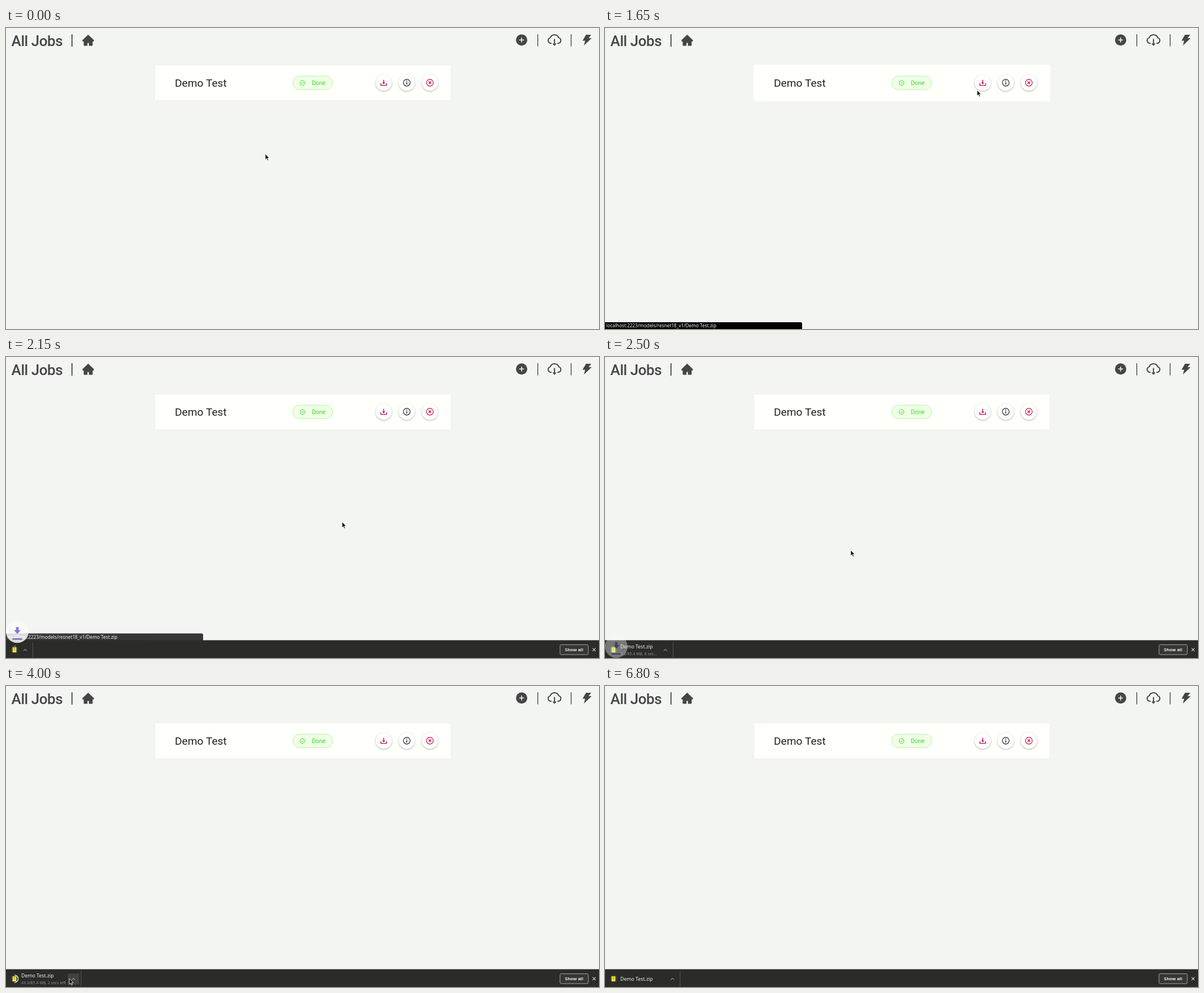
An HTML page that plays this animation: 1050 by 533 pixels, repeating every 6.85 s.

```html
<!DOCTYPE html>
<html lang="en">
<head>
<meta charset="utf-8">
<title>All Jobs</title>
<style>
  html, body { margin: 0; width: 100%; height: 100%; overflow: hidden; background: #f3f5f3; }
  svg { display: block; width: 1050px; height: 533px; }
  text { white-space: pre; }
  .page { font-family: Roboto, sans-serif; }
  .chrome { font-family: "Noto Sans", "Open Sans", sans-serif; }
  .line { fill: none; stroke: currentColor; stroke-width: 1.4; }
  .disc { fill: #fff; filter: drop-shadow(0 1px 1.6px rgba(0, 0, 0, .32)); }
</style>
</head>
<body>
<svg viewBox="0 0 1050 533">
  <rect width="1050" height="533" fill="#f3f5f3"/>

  <g class="page" fill="#454545" color="#454545">
    <text x="9.6" y="31.5" font-size="26" font-weight="500" letter-spacing="-.47">All Jobs</text>
    <path d="M116 11h1.6v22h-1.6zM941 11h1.2v21.5h-1.2zM1000 11h1.2v21.5h-1.2z" fill="#303030"/>
    <path d="M145.5 11.8 155.6 21.6Q156.4 23.8 154.5 24H153.4V30.6Q153.4 31.4 152.6 31.4H146.8V26.4H144.2V31.4H138.4Q137.6 31.4 137.6 30.6V24H136.5Q134.6 23.8 135.4 21.6Z"/>
    <circle cx="913" cy="21.2" r="10"/>
    <path d="M913 17v8.4M908.8 21.2h8.4" stroke="#f3f5f3" stroke-width="1.6"/>
    <path class="line" style="stroke-width:2" d="M966 27h-1.4a4.9 4.9 0 0 1-1-9.6a8 8 0 0 1 15.2 0a4.9 4.9 0 0 1-1 9.6h-1.4"/>
    <path d="M970.2 19.5h2v8h2.8l-3.8 4.3-3.8-4.3h2.8z"/>
    <path d="M1027 12h9.2l-4.7 6h5.5l-13.7 13 2.2-8.5h-4.6z"/>
  </g>

  <rect id="card" x="263.5" y="65.5" width="524.5" height="63.5" rx="1" fill="#fffffb"/>
  <g class="page">
    <text x="299" y="103.5" font-size="19.2" fill="#222">Demo Test</text>
    <rect x="508" y="85.2" width="70" height="24" rx="12" fill="#f0ffe6" stroke="#b6f59e"/>
    <g color="#35d92f">
      <circle class="line" cx="525" cy="97.3" r="4.2" stroke-width="1" style="stroke-width:1"/>
      <path class="line" style="stroke-width:1" d="m523 97.3 1.5 1.6 2.6-3.2"/>
      <text x="541.4" y="101.2" font-size="10.6" fill="currentColor">Done</text>
    </g>
    <circle class="disc" cx="668.8" cy="97" r="14.2"/>
    <circle class="disc" cx="709.6" cy="97" r="14.2"/>
    <circle class="disc" cx="750.5" cy="97" r="14.2"/>
    <path class="line" color="#c20b55" d="M663.8 98v3.6h10V98M668.8 91.8v6"/>
    <path fill="#c20b55" d="M666.2 96.4h5.2l-2.6 3.3z"/>
    <g class="line" color="#222">
      <circle cx="709.6" cy="96.8" r="6" style="stroke-width:1.2"/>
      <path d="M709.6 95.8v4.4M709.6 93v1.5"/>
    </g>
    <g class="line" color="#c5124f">
      <circle cx="750.5" cy="96.8" r="6" style="stroke-width:1.2"/>
      <path d="m748.3 94.6 4.4 4.4m0-4.4-4.4 4.4"/>
    </g>
  </g>

  <g id="bubble" class="chrome">
    <path d="M0 0H346Q349 0 349 3V12.5H0Z"/>
    <text x="2" y="9" font-size="8.28" fill="#f2f2f2">localhost:2223/models/resnet18_v1/Demo Test.zip</text>
  </g>

  <g id="shelf" class="chrome">
    <rect id="bar" width="1050" height="33" fill="#2b2c29"/>
    <g id="content">
      <g id="item">
        <circle cx="15" cy="518.5" r="6.8" fill="#3b3c39"/>
        <path d="M11.6 514h6.8v9h-6.8z" fill="#eee33c"/>
        <path d="M15 515v4.5" stroke="#8c7d18" stroke-width="1.4" stroke-dasharray="1 .6"/>
        <circle id="ring" cx="15" cy="518.5" r="6.6" fill="none" stroke="#eee" stroke-width="1.4" pathLength="100" transform="rotate(-90 15 518.5)"/>
        <text id="name" x="27" font-size="8.75" fill="#eee"></text>
        <text id="status" x="27" y="528" font-size="7" fill="#92938f"></text>
      </g>
      <g id="menu">
        <rect id="hover" x="-23.5" y="509" width="20" height="20" fill="#41423f"/>
        <path id="chevron" class="line" color="#d0d0ce" style="stroke-width:1" d="m-16.5 520.3 2.9-2.9 2.9 2.9"/>
        <path d="M0 505v27" stroke="#555653"/>
      </g>
      <rect x="981" y="509.5" width="50" height="17.5" rx="2" fill="#363734" stroke="#a3a4a1"/>
      <text x="1006" y="521.2" text-anchor="middle" font-size="7.8" font-weight="600" fill="#f0f0ee">Show all</text>
      <path class="line" color="#ddd" style="stroke-width:1.1" d="m1038.7 515.7 5.2 5.2m0-5.2-5.2 5.2"/>
    </g>
  </g>

  <g id="drop">
    <circle r="20" fill="#fbfbf8"/>
    <path d="M-2.4-8h4.8v5.5H6L0 4-6-2.5h3.6zM-8.5 12h17v2.2h-17z" fill="#6767d4"/>
  </g>

  <g id="cursor" stroke="#fff" stroke-width=".8" stroke-linejoin="round">
    <path id="arrow" d="M0 0V10.2L2.3 8 3.9 11.7 5.7 10.9 4.1 7.4H7.3Z" fill="#111"/>
    <path id="hand" d="M0 0Q1.6-.9 2 .8V3.6L6 4.6Q7 5 6.8 6.5L5.7 10H-.2L-3.4 6.2Q-3.4 4.6-1.8 5.2L-.6 6V.8Z" fill="#111"/>
  </g>
</svg>
<script>
const LOOP = 6850, STEP = 50;
const el = Object.fromEntries([...document.querySelectorAll('[id]')].map(e => [e.id, e]));

// Each track is a list of [time, value, ...] joined by straight lines.
const cursorTrack = [
  [50, 459, 223], [400, 528, 200], [500, 528, 200], [700, 690, 108], [750, 708, 92],
  [850, 662, 98], [1600, 662, 98], [2000, 636, 194], [2150, 595, 292], [2300, 569, 317],
  [2500, 435, 342], [2750, 148, 489], [2850, 148, 489], [3200, 112, 518], [4000, 112, 518],
  [4300, 60, 350], [4400, 60, 350], [4450, 6, 132], [4550, 6, 132], [4750, 35, 5]
];
const shelfTrack = [[1960, 533], [2000, 523], [2100, 501.5]];
const itemTrack = [[2000, 8.5], [2150, 47.5], [2500, 120.5], [2580, 133]];
const bubbleTrack = [[850, 0], [950, 1], [2050, 1], [2150, .78], [2250, 0]];
const progress = [
  [0, '3.2', ', 8 secs left', 4], [3000, '12.6', ', 4 secs left', 15],
  [3500, '27.4', ', 3 secs left', 32], [4000, '43.3', ', 2 secs left', 51],
  [4450, '56.1', ', 1 sec left', 66], [4950, '56.1', ', 1 sec left', 78],
  [5450, '85.4', ', 0 secs left', 95], [5700, '85.4', ', 0 secs left', 100],
  [5900, '85.4', '', 100]
];

const clamp = v => Math.min(1, Math.max(0, v));
const span = (t, from, to) => clamp((t - from) / (to - from));

function sample(track, t) {
  const i = track.findIndex(k => k[0] > t);
  if (i === 0) return track[0].slice(1);
  if (i < 0) return track[track.length - 1].slice(1);
  const a = track[i - 1], b = track[i], p = span(t, a[0], b[0]);
  return a.slice(1).map((v, n) => v + (b[n + 1] - v) * p);
}

function show(node, on) { node.style.display = on ? '' : 'none'; }
function move(node, x, y) { node.setAttribute('transform', `translate(${x} ${y})`); }

function fitText(node, text, room) {
  node.textContent = room > 8 ? text : '';
  while (text && room > 8 && node.getComputedTextLength() > room) {
    text = text.slice(0, -1);
    node.textContent = text + '…';
  }
}

function drawCursor(t) {
  const [x, y] = sample(cursorTrack, t);
  const overButton = [668.8, 709.6, 750.5].some(cx => Math.hypot(x - cx, y - 97) < 14.2);
  show(el.cursor, t < 4800);
  move(el.cursor, x, y);
  show(el.arrow, !overButton);
  show(el.hand, overButton);
  const overCard = x > 263 && x < 788 && y > 65 && y < 129;
  el.card.setAttribute('stroke', overCard ? '#fffffb' : '#edefec');
  show(el.hover, t >= 3150 && t <= 4000);
}

function drawShelf(t) {
  const [top] = sample(shelfTrack, t), [width] = sample(itemTrack, t);
  show(el.shelf, top < 533);
  el.bar.setAttribute('y', top);
  move(el.content, 0, (top - 501.5) * .66);
  move(el.menu, width, 0);
  show(el.chevron, width > 30);
  show(el.item, width > 30);

  const [, done, left, percent] = progress.filter(k => k[0] <= t).pop();
  const settle = span(t, 6100, 6400), room = width - 27 - 27;
  fitText(el.name, 'Demo Test.zip', room);
  fitText(el.status, `${done}/85.4 MB${left}`, width >= 133 ? 90 : room + 1);
  el.name.setAttribute('y', 516 + 6.3 * settle);
  el.status.setAttribute('opacity', 1 - settle);
  el.ring.setAttribute('stroke-dasharray', `${percent} 100`);
  el.ring.setAttribute('opacity', 1 - span(t, 6100, 6550));

  move(el.bubble, 0, top - 12);
  el.bubble.setAttribute('opacity', sample(bubbleTrack, t)[0]);
}

function drawDrop(t) {
  const p = span(t, 1970, 2560);
  move(el.drop, 20, 475 + (t - 2000) * .0757);
  el.drop.setAttribute('opacity', 1 - 4 * (p - .5) ** 2);
}

function frame(now) {
  const t = Math.floor((now % LOOP) / STEP) * STEP;
  drawCursor(t);
  drawShelf(t);
  drawDrop(t);
  requestAnimationFrame(() => frame(performance.now() - start));
}

const start = performance.now();
frame(0);
</script>
</body>
</html>
```
